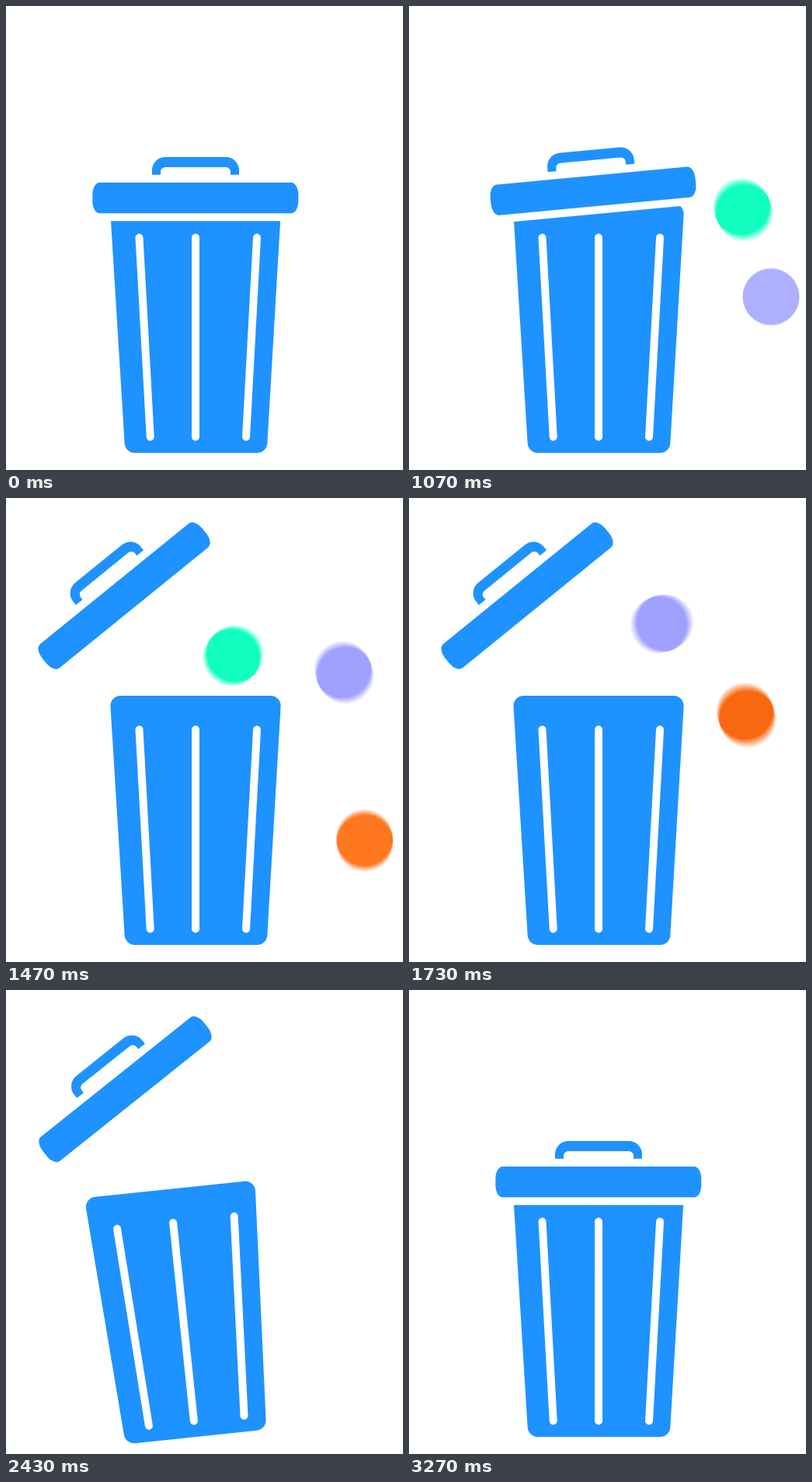
These frames come from a looping animation (511 px wide and 596 px high, 4.51 s). An HTML page with a canvas:

```html
<!DOCTYPE html>
<html lang="en">
<head>
<meta charset="utf-8">
<title>Bin</title>
<style>
  html, body { margin: 0; width: 100%; height: 100%; overflow: hidden; background: #fff; }
  canvas { display: block; width: 511px; height: 596px; }
</style>
</head>
<body>
<canvas id="stage" width="511" height="596"></canvas>
<script>
const ctx = document.getElementById('stage').getContext('2d');
const LOOP = 4510;
const BLUE = '#1e92ff';
const LID = { x: 243.75, y: 246.5 };
const RADIUS = 36.5;
const FLIGHT = 950;
const SHUTTER = 16;
const SAMPLES = 8;

// Each ball is thrown from (x, y) at a moment; power shapes its acceleration
const balls = [
  { color: '#10ffc0', x: 466, y: 487, peak: 124, from: 690, power: 1.44 },
  { color: '#a29eff', x: 466, y: 380, peak: 91, from: 955, power: 2.3 },
  { color: '#fa6a0f', x: 463, y: 491, peak: 110, from: 1254, power: 2.08 }
];

const span = (t, a, b) => Math.min(1, Math.max(0, (t - a) / (b - a)));
const mix = (a, b, p) => a + (b - a) * p;
const rad = deg => deg * Math.PI / 180;

function bezier(a, b, c, d, u) {
  const v = 1 - u;
  return v * v * v * a + 3 * v * v * u * b + 3 * v * u * u * c + u * u * u * d;
}

// Straight up, over, and down into the bin
function ballAt({ x, y, peak, from, power }, t) {
  const u = span(t, from, from + FLIGHT) ** power;
  return [bezier(x, x, 262, 261, u), bezier(y, 105, peak, 300, u)];
}

// Damped swing that dies out after one second
function swayAngle(t) {
  const s = t - 2290;
  if (s < 0 || s > 1000) return 0;
  return -8.15 * (1 - s / 1000) ** 2 * Math.sin(Math.PI * s / 270);
}

function lidOpenness(t) {
  if (t < 2000) return 1 - (1 - span(t, 1040, 1475)) ** 2;
  return 1 - span(t, 2383, 2822) ** 2;
}

// Averages several moments for motion blur
function drawBall(ball, t) {
  const age = t - ball.from;
  if (age < 0 || age > FLIGHT) return;
  ctx.save();
  ctx.globalCompositeOperation = 'lighter';
  ctx.globalAlpha = (1 - Math.exp(-age / 70)) / SAMPLES;
  ctx.fillStyle = ball.color;
  for (let k = 0; k < SAMPLES; k++) {
    const shift = (k / (SAMPLES - 1) - 0.5) * SHUTTER;
    ctx.beginPath();
    ctx.arc(...ballAt(ball, t + shift), RADIUS, 0, 2 * Math.PI);
    ctx.fill();
  }
  ctx.restore();
}

function drawBody(angle) {
  ctx.save();
  ctx.translate(244, 574);
  ctx.rotate(rad(angle));
  ctx.translate(-244, -574);

  ctx.fillStyle = BLUE;
  ctx.beginPath();
  ctx.moveTo(244, 254);
  ctx.arcTo(354.4, 254, 335.6, 574, 13);
  ctx.arcTo(335.6, 574, 153.4, 574, 13);
  ctx.arcTo(153.4, 574, 133.6, 254, 13);
  ctx.arcTo(133.6, 254, 244, 254, 13);
  ctx.closePath();
  ctx.fill();

  ctx.strokeStyle = '#fff';
  ctx.lineWidth = 10;
  ctx.lineCap = 'round';
  ctx.beginPath();
  for (const [top, bottom] of [[171.5, 185.7], [244, 244], [323, 309]]) {
    ctx.moveTo(top, 297.5);
    ctx.lineTo(bottom, 553.5);
  }
  ctx.stroke();
  ctx.restore();
}

function drawLid(p) {
  // The lid tips first, then lifts away
  const knee = 0.385;
  const shift = p < knee ? 0.54 * p : mix(0.54 * knee, 1, span(p, knee, 1));
  ctx.save();
  ctx.translate(LID.x - 91.75 * shift, LID.y - 121 * shift);
  ctx.rotate(rad(-39 * p));
  ctx.translate(-LID.x, -LID.y);

  ctx.fillStyle = BLUE;
  ctx.strokeStyle = '#fff';
  ctx.lineWidth = 20;
  ctx.lineJoin = 'round';
  ctx.beginPath();
  ctx.roundRect(111.3, 226.8, 265, 39.5, { x: 9.5, y: 15 });
  ctx.stroke();
  ctx.fill();

  ctx.beginPath();
  ctx.moveTo(188, 216.8);
  ctx.arcTo(188, 194, 205, 194, 17);
  ctx.arcTo(300, 194, 300, 211, 17);
  ctx.lineTo(300, 216.8);
  ctx.lineTo(289, 216.8);
  ctx.arcTo(289, 207, 283, 207, 6);
  ctx.arcTo(199, 207, 199, 213, 6);
  ctx.lineTo(199, 216.8);
  ctx.closePath();
  ctx.fill();
  ctx.restore();
}

const start = performance.now();

function draw() {
  const t = (performance.now() - start) % LOOP;
  ctx.clearRect(0, 0, 511, 596);
  for (const ball of balls) drawBall(ball, t);
  drawBody(swayAngle(t));
  drawLid(lidOpenness(t));
  requestAnimationFrame(draw);
}
draw();
</script>
</body>
</html>
```
